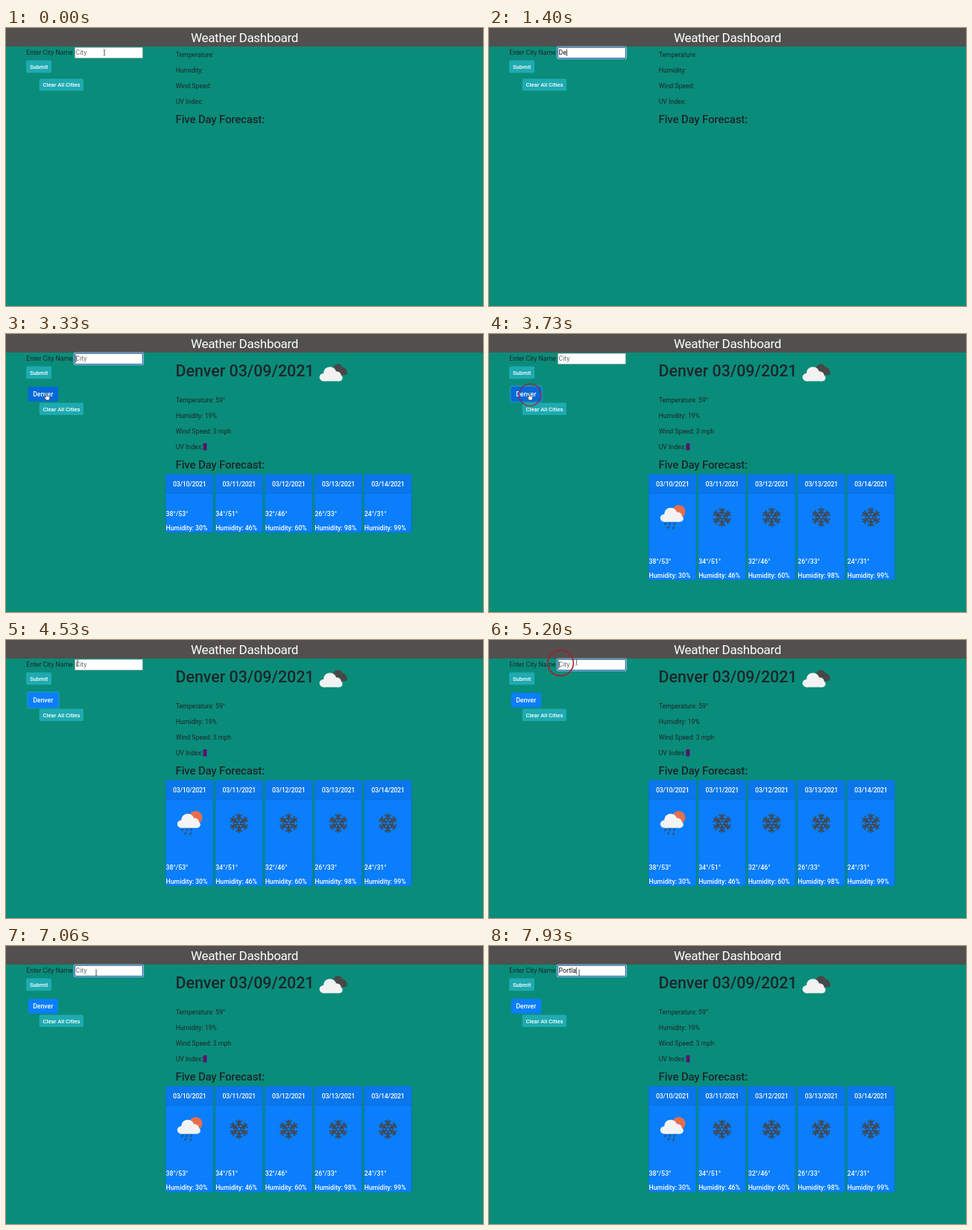
Write an HTML page that moves like this. It is 640 px wide and 374 px high and loops after 8 s.

```html
<!DOCTYPE html>
<html lang="en">
<head>
<meta charset="utf-8">
<title>Weather Dashboard</title>
<style>
html, body { margin: 0; width: 100%; height: 100%; overflow: hidden; background: #0a8c7a; }
svg { display: block; width: 100%; height: 100%; }
text { font: 8.7px Roboto, sans-serif; fill: #1c272b; white-space: pre; }
.light { fill: #fff; font-weight: 500; }
.small { font-size: 7.6px; }
.title { font-size: 17px; fill: #fff; letter-spacing: -.3px; text-anchor: middle; }
.city { font-size: 21.4px; font-weight: 500; letter-spacing: -.02px; }
.sub { font-size: 15px; font-weight: 500; letter-spacing: -.18px; }
.date { letter-spacing: -.2px; text-anchor: middle; }
.body { fill: #0b7efc; stroke: #0a6fc4; stroke-width: .6; }
</style>
</head>
<body>
<svg viewBox="0 0 640 374" preserveAspectRatio="none">
  <defs>
    <g id="cloud">
      <circle cx="6" cy="16" r="6"/><circle cx="14" cy="9" r="8.5"/>
      <circle cx="23" cy="13" r="6"/><circle cx="26" cy="17" r="5"/>
      <rect x="6" y="12" width="20" height="10"/>
    </g>
    <g id="arm"><path d="M0 -2.6V-13M-4 -11.6L0 -8L4 -11.6M-3.2 -7.4L0 -4.6L3.2 -7.4"/></g>
    <g id="flake" fill="none" stroke="#41474e" stroke-width="1.8"></g>
    <g id="shower">
      <circle cx="254.6" cy="238.8" r="8.9" fill="#e66e4d"/>
      <use href="#cloud" transform="translate(229.8 233.4) scale(1 .88)" fill="#f3f3f3"/>
      <path d="M237 254.6l-.8 1.6M243 254.6l-.8 1.6M249 254.6l-.8 1.6M241 259.4l-.8 1.6M248 260l-.8 1.6" stroke="#3f4852" stroke-width="1.8" stroke-linecap="round"/>
    </g>
  </defs>

  <rect width="640" height="25" fill="#51504e"/>
  <text class="title" x="320" y="19.2">Weather Dashboard</text>

  <text x="27.3" y="36.4">Enter City Name</text>
  <rect x="92.3" y="26.1" width="91" height="14.4" fill="#fff" stroke="#8a9592" stroke-width=".6"/>
  <g id="focus" fill="none">
    <rect x="91.3" y="25.1" width="93" height="16.4" rx="1.5" stroke="#e8f2f4" stroke-width=".8"/>
    <rect x="92.2" y="26" width="91.2" height="14.6" rx="1" stroke="#1f62b8" stroke-width="1.1"/>
  </g>
  <text id="entry" x="93.6" y="36.4"></text>
  <path id="caret" d="M0 28.6V38" stroke="#111" stroke-width=".8"/>

  <rect x="27" y="43.5" width="34" height="16.7" rx="1.6" fill="#1eaab0"/>
  <text class="light small" x="32" y="54.6">Submit</text>
  <g id="saved">
    <rect id="halo" x="27.7" y="69" width="44.4" height="23.6" rx="3.6" fill="#188ebd"/>
    <rect id="pill" x="29.7" y="70.9" width="40.4" height="19.8" rx="2.2"/>
    <text class="light" x="36.2" y="83.8">Denver</text>
  </g>
  <g id="clear">
    <rect x="44.7" y="68.2" width="59.2" height="16.4" rx="1.6" fill="#1eaab0"/>
    <text class="light small" x="49.6" y="79.2">Clear All Cities</text>
  </g>

  <g id="head">
    <text class="city" x="227.5" y="45.7">Denver 03/09/2021</text>
    <g id="now">
      <use href="#cloud" transform="translate(435 28.6) scale(.74 .7)" fill="#484848"/>
      <use href="#cloud" transform="translate(420.6 32.6) scale(1 .89)" fill="#f2f2f2"/>
    </g>
  </g>
  <g id="stats">
    <text class="stat" x="227.7" y="39"></text>
    <text class="stat" x="227.7" y="60.1"></text>
    <text class="stat" x="227.7" y="81.2"></text>
    <text x="227.7" y="102.3">UV Index:</text>
    <rect id="uv" x="264.6" y="94.2" width="4.8" height="9.6" rx="1.2" fill="#5c0f70"/>
    <text class="sub" x="227.6" y="128">Five Day Forecast:</text>
  </g>
  <g id="cards"></g>

  <circle id="ring" fill="none" stroke="#a81c2c"/>
  <path id="beam" d="M-1.4 -4.2Q0 -4.2 0 -3V3Q0 4.2 -1.4 4.2M1.4 -4.2Q0 -4.2 0 -3V3Q0 4.2 1.4 4.2" fill="none" stroke="#666" stroke-width=".7"/>
  <path id="hand" d="M-1.6 -4Q-.8 -5 0 -4V-1L3 -.2Q4 .2 3.6 2L2.6 4.4H-1.2L-3.6 .8Q-3.4 -.4 -1.6 .8Z" fill="#fff" stroke="#222" stroke-width=".6"/>
</svg>
<script>
const $ = id => document.getElementById(id);
const show = (id, on) => $(id).style.display = on ? '' : 'none';
const place = (id, x, y) => $(id).setAttribute('transform', `translate(${x} ${y})`);

$('flake').innerHTML = [0, 60, 120, 180, 240, 300]
  .map(a => `<use href="#arm" transform="rotate(${a})"/>`).join('') + '<circle r="2.4" stroke-width="1.2"/>';

const days = [['38°/53°', 30], ['34°/51°', 46], ['32°/46°', 60], ['26°/33°', 98], ['24°/31°', 99]];
$('cards').innerHTML = days.map(([temp, wet], i) => {
  const x = 214.4 + 66.55 * i;
  const icon = i ? `<use href="#flake" x="${x + 31.7}" y="246.4"/>` : '<use href="#shower"/>';
  return `<rect class="body" x="${x}" y="188.7" width="63.5" rx="1.6"/>
    <rect x="${x + .3}" y="189" width="62.9" height="25.2" rx="1.4" fill="#0a76ec"/>
    <path d="M${x} 214.2h63.5" stroke="#0968d2" stroke-width=".6"/>
    <text class="light date" x="${x + 31.8}" y="204.6">03/${10 + i}/2021</text>
    <g class="icon">${icon}</g>
    <g class="info"><text class="light" x="${x + .2}" y="244.8">${temp}</text>
    <text class="light" x="${x + .2}" y="263.9">Humidity: ${wet}%</text></g>`;
}).join('');
const all = s => document.querySelectorAll(s);
const stats = all('.stat'), bodies = all('.body'), icons = all('.icon'), infos = all('.info');

const LOOP = 8000, SENT = 2330, RESULT = 2600, FORECAST = 2800, ICONS = 3500;
const words = [
  { text: 'Denver', keys: [1260, 1400, 1530, 1660, 1860, 1930], end: SENT },
  { text: 'Portla', keys: [7330, 7400, 7460, 7600, 7660, 7730], end: LOOP }
];
const clicks = [[60, 132, 33], [3600, 55, 82], [5000, 96, 31], [6140, 120, 36]];
// time, x, y of the pointer
const path = [[0, 132, 33], [2860, 132, 33], [3260, 55, 84.5], [4260, 55, 84.5], [4530, 96, 31],
  [5000, 96, 31], [5200, 117.5, 29.5], [5660, 120, 35], [6460, 120, 35], [7060, 121, 36], [LOOP, 121, 36]];

function pointer(t) {
  const i = path.findIndex(p => p[0] > t), [t0, x0, y0] = path[i - 1], [t1, x1, y1] = path[i];
  const p = (t - t0) / (t1 - t0), e = p * p * (3 - 2 * p);
  return [x0 + (x1 - x0) * e, y0 + (y1 - y0) * e];
}

function draw(t) {
  const result = t >= RESULT, forecast = t >= FORECAST, loaded = t >= ICONS;
  const word = words.find(w => t >= w.keys[0] && t < w.end);
  const typed = word ? word.text.slice(0, word.keys.filter(k => k <= t).length) : '';
  const pressed = t >= 3600 && t < 5000;
  const focused = t >= 60 && !pressed;

  const entry = $('entry');
  entry.textContent = typed || 'City';
  entry.style.fill = typed ? '#111' : '#6c6c6c';
  show('focus', focused);
  const reset = Math.max(0, ...[60, SENT, 5000, 6140, ...words.flatMap(w => w.keys)].filter(k => k <= t));
  show('caret', focused && (t - reset) % 1000 < 500);
  place('caret', 94 + (typed ? entry.getComputedTextLength() : 0), 0);

  const [x, y] = pointer(t);
  const over = result && x > 29 && x < 70 && y > 70 && y < 91;
  show('saved', result);
  show('halo', pressed);
  $('pill').style.fill = over ? '#0768d8' : '#0b7efc';
  place('clear', 0, result ? 24.4 : 0);

  show('head', result);
  show('now', forecast);
  place('head', 0, forecast ? 11.3 : 0);
  place('stats', 0, forecast ? 52.8 : result ? 25.3 : 0);
  ['Temperature: 59°', 'Humidity: 19%', 'Wind Speed: 3 mph'].forEach((s, i) =>
    stats[i].textContent = result ? s : s.split(':')[0] + ':');
  show('uv', forecast);
  show('cards', forecast);
  bodies.forEach(b => b.setAttribute('height', loaded ? 142.2 : 78.4));
  icons.forEach(g => g.style.display = loaded ? '' : 'none');
  infos.forEach(g => g.setAttribute('transform', `translate(0 ${loaded ? 63.8 : 0})`));

  show('hand', over);
  show('beam', !over && (t < 1260 || t >= 2860));
  place('hand', x, y);
  place('beam', x, y);

  const click = clicks.find(c => t >= c[0] && t < c[0] + 290);
  show('ring', click);
  if (click) {
    const age = t - click[0], ring = $('ring');
    place('ring', click[1], click[2]);
    ring.setAttribute('r', 10 + age * .036);
    ring.setAttribute('stroke-width', 1 + age * .003);
    ring.setAttribute('opacity', Math.min(1, .5 + age / 400));
  }
}

function tick(now) {
  draw(now % LOOP);
  requestAnimationFrame(tick);
}
requestAnimationFrame(tick);
</script>
</body>
</html>
```
